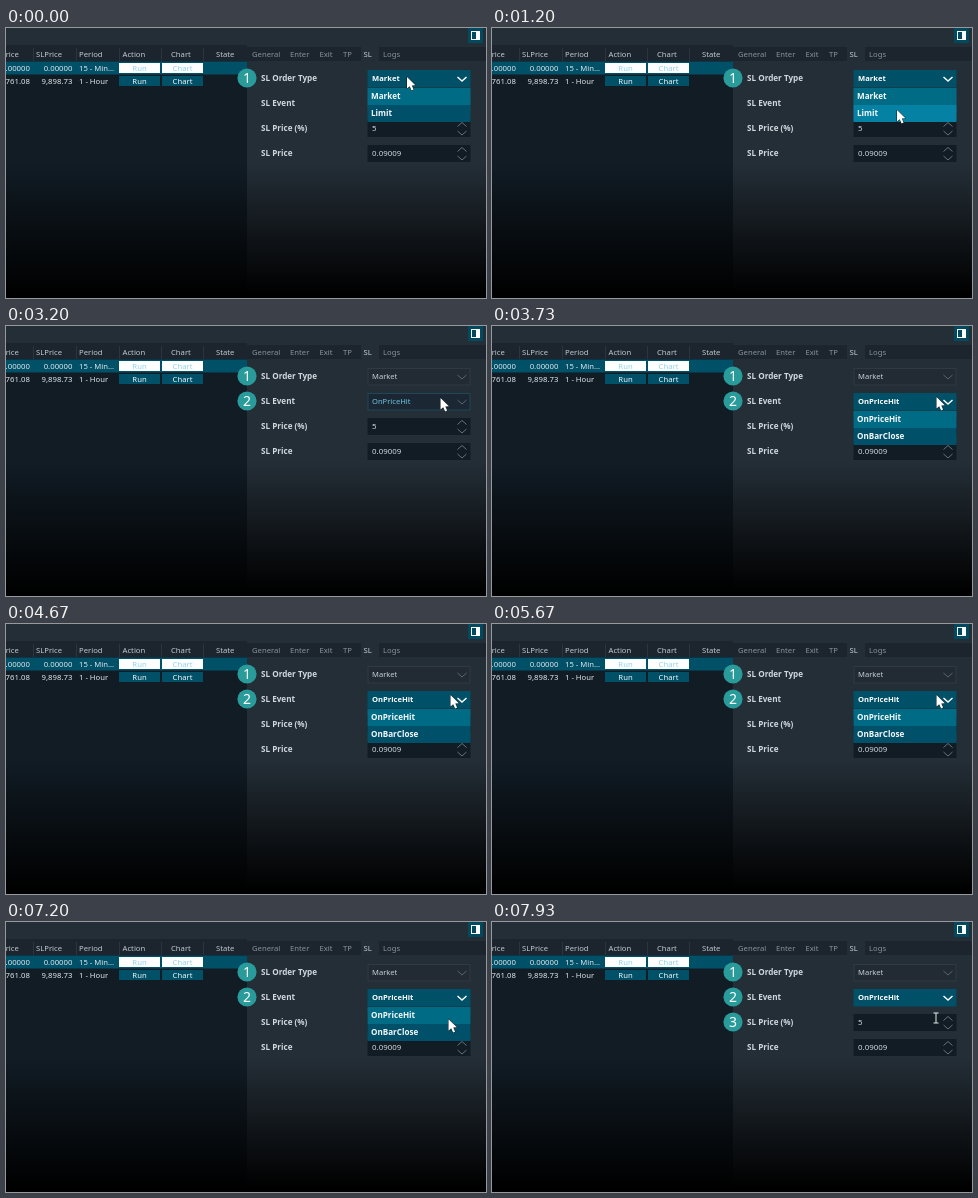
An HTML page with a canvas for the animation above (8000 ms loop, 480 px wide and 270 px high).

```html
<!DOCTYPE html>
<html lang="en">
<head>
<meta charset="utf-8">
<title>Stop-loss settings</title>
<style>
html, body { margin: 0; width: 100%; height: 100%; overflow: hidden; background: #000; }
canvas { display: block; width: 480px; height: 270px; }
</style>
</head>
<body>
<canvas id="stage" width="480" height="270"></canvas>
<script>
const ctx = document.getElementById('stage').getContext('2d');
const LOOP = 8000;
const PANEL = '#242e37', DARK = '#111c25', BAR = '#1c252e', TEAL = '#005068';

// Cursor path: time, x, y
const path = [
  [0, 401, 49], [670, 401, 49], [930, 403, 62], [1200, 405, 82], [1530, 405, 82],
  [1730, 405, 69], [2940, 405, 69], [3200, 434.5, 72], [3530, 444.5, 71],
  [6270, 444.5, 71], [6530, 442.5, 87], [6870, 442.5, 105], [7060, 442.5, 105],
  [7330, 442.5, 90], [LOOP, 442.5, 90]
];

function cursorAt(t) {
  const i = path.findIndex(p => p[0] > t);
  const [t0, x0, y0] = path[i - 1], [t1, x1, y1] = path[i];
  const k = (t - t0) / (t1 - t0);
  return [x0 + (x1 - x0) * k, y0 + (y1 - y0) * k];
}

function rect(x, y, w, h, fill) {
  ctx.fillStyle = fill;
  ctx.fillRect(x, y, w, h);
}

function text(s, x, y, fill, size = 7.7, weight = 500, align = 'left') {
  ctx.font = `${weight} ${size}px "Noto Sans", "Open Sans", sans-serif`;
  ctx.textAlign = align;
  ctx.fillStyle = fill;
  ctx.fillText(s, x, y);
}

function chevron(y, dy, color, width = 1) {
  ctx.strokeStyle = color;
  ctx.lineWidth = width;
  ctx.beginPath();
  ctx.moveTo(451.5, y);
  ctx.lineTo(456, y + dy);
  ctx.lineTo(460.5, y);
  ctx.stroke();
}

function button(label, x, y, selected) {
  rect(x, y, 41, 10, selected ? '#fff' : TEAL);
  text(label, x + 20.5, y + 8, selected ? '#8fd4ee' : '#f2f6f8', 7.7, 500, 'center');
}

function table() {
  rect(0, 17, 241, 253, DARK);
  rect(0, 17, 241, 16, BAR);
  rect(0, 33.5, 241, 13, TEAL);
  for (const x of [27, 70, 113, 155, 197]) rect(x, 20, 1, 13, '#2b353f');
  const heads = [['Price', -5], ['SLPrice', 30], ['Period', 73], ['Action', 116.5], ['Chart', 165], ['State', 210]];
  for (const [s, x] of heads) text(s, x, 29, '#c3cad0');
  const rows = [
    ['0.00000', '0.00000', '15 - Min...', 43],
    ['9,761.08', '9,898.73', '1 - Hour', 56]
  ];
  rows.forEach(([price, sl, period, y], i) => {
    text(price, 24, y, '#e2e8ec', 7.8, 500, 'right');
    text(sl, 66.5, y, '#e2e8ec', 7.8, 500, 'right');
    text(period, 73, y, '#e2e8ec');
    button('Run', 113, y - 8, !i);
    button('Chart', 156, y - 8, !i);
  });
}

function tabs() {
  rect(241, 19, 239, 14, BAR);
  rect(355, 19, 18, 14, PANEL);
  const names = [['General', 246], ['Enter', 284], ['Exit', 313.5], ['TP', 337], ['SL', 357.5], ['Logs', 377]];
  for (const [s, x] of names) text(s, x, 28.7, s === 'SL' ? '#c9d1d8' : '#89939c');
  rect(462, 0, 15, 15, '#00495f');
  ctx.strokeStyle = '#fff';
  ctx.lineWidth = 1;
  ctx.strokeRect(465.5, 3.5, 8, 8);
  rect(470, 4, 4, 8, '#fff');
}

const comboStyles = {
  idle: ['#222a33', '#303942', '#c6ced5', '#5b656f'],
  hover: ['#1b2732', '#20465a', '#6cc6e8', '#5b656f'],
  focus: [TEAL, TEAL, '#fff', '#fff']
};

function combo(value, y, state) {
  const [fill, edge, ink, arrow] = comboStyles[state];
  const focused = state === 'focus';
  rect(361.5, y, 103, 17.5, edge);
  rect(362.5, y + 1, 101, 15.5, fill);
  text(value, 366, y + 11.2, ink, 7.6, focused ? 600 : 500);
  chevron(y + 7, 4, arrow, focused ? 1.4 : 1);
}

function spin(value, y) {
  rect(361.5, y, 103, 17, DARK);
  text(value, 366, y + 11.3, '#d3dae0', 7.9);
  chevron(y + 6.5, -4, '#66717b');
  chevron(y + 11, 4, '#66717b');
}

function menu(items, y, hovered) {
  items.forEach((s, i) => {
    const top = y + i * 17;
    rect(361.5, top, 103, 17, i ? (hovered ? '#0481a3' : '#00506a') : '#006b85');
    text(s, 365, top + 10.8, '#f4f8fa', 8.1, 600);
  });
}

function badge(n, y, alpha) {
  ctx.globalAlpha = alpha;
  ctx.fillStyle = '#2a9b9b';
  ctx.beginPath();
  ctx.arc(241, y, 9.6, 0, 7);
  ctx.fill();
  text(n, 241, y + 5, '#fff', 14, 400, 'center');
  ctx.globalAlpha = 1;
}

function arrow(x, y) {
  ctx.save();
  ctx.translate(x, y);
  ctx.beginPath();
  [[0, 0], [0, 11.5], [2.7, 9.2], [4.6, 13.4], [6.6, 12.5], [4.8, 8.4], [8.4, 8.2]]
    .forEach(p => ctx.lineTo(...p));
  ctx.closePath();
  ctx.lineWidth = 1;
  ctx.strokeStyle = '#10161c';
  ctx.stroke();
  ctx.fillStyle = '#fff';
  ctx.fill();
  ctx.restore();
}

function beam(x, y) {
  rect(x - 0.5, y - 5, 1, 10, '#e4e8eb');
  rect(x - 2.5, y - 5.5, 5, 1, '#e4e8eb');
  rect(x - 2.5, y + 4.5, 5, 1, '#e4e8eb');
}

const fade = (t, start, end) => t < start ? 0 : t < end ? 0.5 : 1;

function draw(t) {
  const [x, y] = cursorAt(t);
  const firstOpen = t < 2260;
  const secondOpen = t >= 3660 && t < 7860;

  rect(0, 0, 480, 270, PANEL);
  table();
  tabs();
  ['SL Order Type', 'SL Event', 'SL Price (%)', 'SL Price']
    .forEach((s, i) => text(s, 255, 53 + i * 25, '#d0d7dd', 8.15, 600));

  combo('Market', 42, t < 2325 ? 'focus' : 'idle');
  combo('OnPriceHit', 67, t < 2325 ? 'idle' : t < 3660 ? 'hover' : 'focus');
  spin('5', 92);
  spin('0.09009', 117);
  if (firstOpen) menu(['Market', 'Limit'], 60, y >= 77);
  if (secondOpen) menu(['OnPriceHit', 'OnBarClose'], 85, y >= 102);

  const shade = ctx.createLinearGradient(0, 135, 0, 266);
  shade.addColorStop(0, 'rgba(0,0,0,0)');
  shade.addColorStop(1, '#000');
  rect(0, 135, 480, 135, shade);

  badge('1', 50, 1);
  badge('2', 75, fade(t, 2660, 2790));
  badge('3', 100, fade(t, 7860, 7925));
  if (t < 7860) arrow(x, y);
  else beam(444, 96);
}

function tick() {
  draw(performance.now() % LOOP);
  requestAnimationFrame(tick);
}
tick();
</script>
</body>
</html>
```
